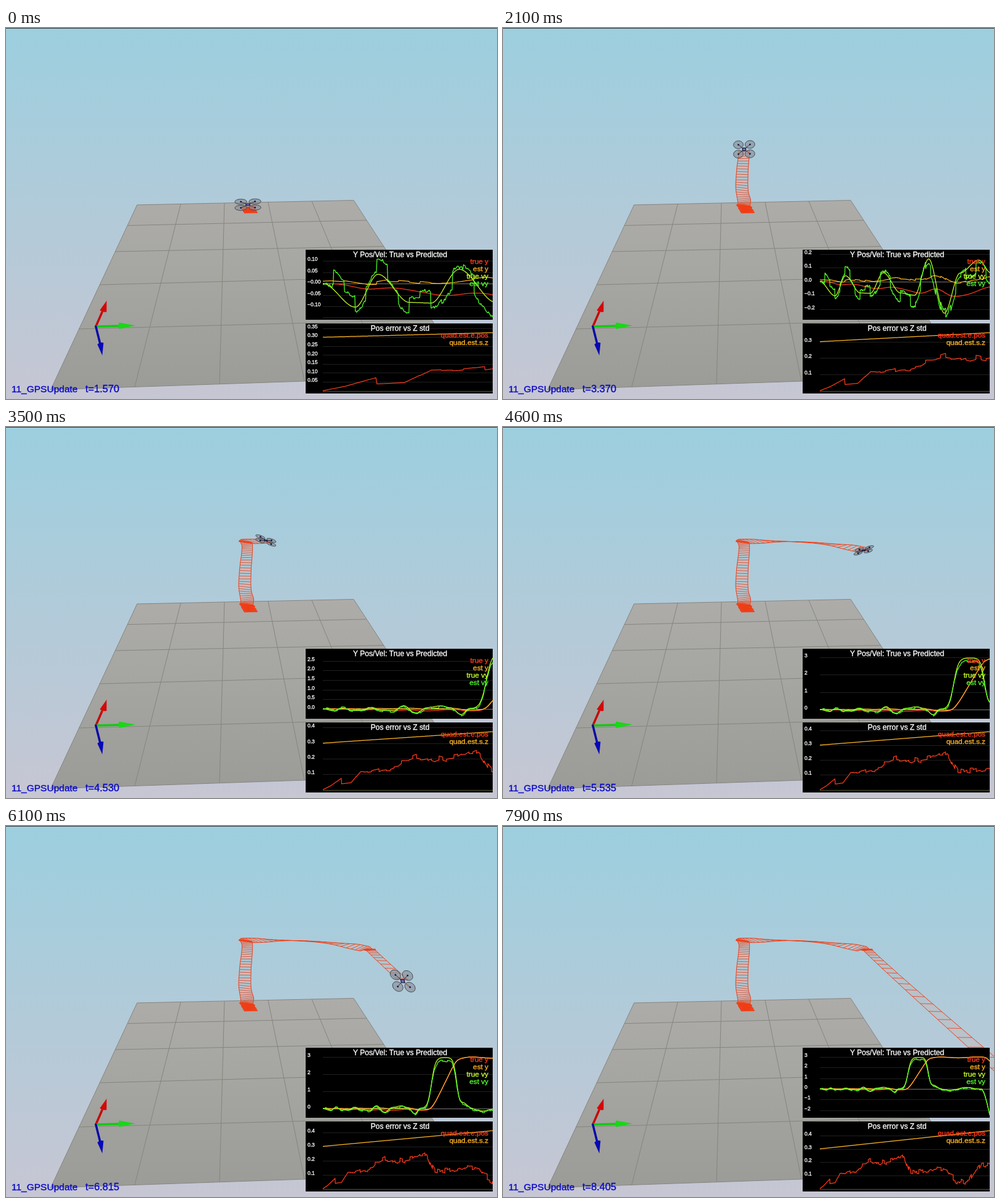
These frames come from a looping animation (798x604 px, 8000 ms). An HTML page:

```html
<!DOCTYPE html>
<html lang="en">
<head>
<meta charset="utf-8">
<title>Quad estimator</title>
<style>
html, body { margin: 0; width: 100%; height: 100%; overflow: hidden; background: #b4c9d6; }
svg { display: block; width: 798px; height: 604px; }
text { font-family: "Liberation Sans", Arial, sans-serif; stroke-width: .35; }
.thin * { vector-effect: non-scaling-stroke; }
.plot { fill: none; stroke-width: 1.25; stroke-linejoin: round; }
.status { fill: #0808c8; stroke: #0808c8; }
</style>
</head>
<body>
<svg viewBox="0 0 798 604">
  <defs>
    <linearGradient id="sky" x1="0" y1="0" x2="0" y2="1">
      <stop offset="0" stop-color="#9ccfdf"/><stop offset="1" stop-color="#c7c6d3"/>
    </linearGradient>
    <linearGradient id="floor" x1="0" y1="0" x2="0" y2="1">
      <stop offset="0" stop-color="#adaca9"/><stop offset="1" stop-color="#9b9c97"/>
    </linearGradient>
  </defs>
  <rect width="798" height="604" fill="url(#sky)"/>
  <rect width="798" height="1" fill="#333a3d"/>
  <path d="M213 288L565 280.500L751 566L72.500 589Z" fill="url(#floor)" stroke="#85857f"/>
  <path d="M284 286.500L209 585M355 285L347 580M426 283.500L485 575M497 282L617 571
    M198 321.500L586 313M177 364L614 355.500M152 418L647 405M118 490L689 475" fill="none" stroke="#85857f"/>
  <g stroke-width="3.500" stroke-linecap="round">
    <path d="M146 486L156 463" stroke="#c40808"/>
    <path d="M163.500 444L152.500 459.500Q157 464 163.500 462Z" fill="#d40808"/>
    <path d="M146 486L184 485" stroke="#14c814"/>
    <path d="M210.500 484.500L184 479.500Q181 485 184 490Z" fill="#18d818"/>
    <path d="M146 486L153 514" stroke="#0808a8"/>
    <path d="M156.500 533L148.500 515Q153 511 158.500 512.500Z" fill="#0808b8"/>
  </g>
  <path id="band" fill="#c8aaa0" fill-opacity=".25"/>
  <path id="rungs" fill="none" stroke="#f23c14" stroke-width=".8"/>
  <path id="rails" fill="none" stroke="#f23c14"/>
  <g id="drone" class="thin"></g>
  <g id="charts"></g>
  <text class="status" x="9" y="593" font-size="15.500">11_GPSUpdate</text>
  <text class="status" id="clock" x="129" y="593" font-size="16.400"></text>
</svg>
<script>
const $ = id => document.getElementById(id);
const clamp = (v, a, b) => Math.min(b, Math.max(a, v));
const smooth = u => { u = clamp(u, 0, 1); return u * u * (3 - 2 * u); };
const sigmoid = u => 1 / (1 + Math.exp(-u));
const bump = (t, mid, width) => Math.exp(-(((t - mid) / width) ** 2));
const hash = n => { const s = Math.sin(n * 12.9898) * 43758.5453; return s - Math.floor(s); };

// Run through [time, value] points with the given easing.
const through = (points, ease) => t => {
  let i = 0;
  while (i < points.length - 2 && t >= points[i + 1][0]) i++;
  const [a, u] = points[i], [b, v] = points[i + 1];
  return u + (v - u) * ease(clamp((t - a) / (b - a), 0, 1));
};
const straight = u => u;

// Simulation clock: 100 ms steps, two of them held.
const simTime = through([[0, 1.57], [9, 2.31], [21, 3.37], [34, 4.53], [45, 5.535], [59, 6.815], [77, 8.405]], straight);
const clockAt = k => Math.round(simTime(k - (k >= 31) - (k >= 58)) * 200) / 200;

// Sideways speed: hover sway, one fast leg, a settling wave, then the way back.
const sway = through([[0, 0], [.3, -.104], [.51, .041], [.8, -.083], [1, -.086], [1.26, .063], [1.6, -.083],
  [1.88, -.1], [2.16, .163], [2.47, -.23], [2.78, .06], [3.15, .155], [3.4, .06], [3.69, -.3], [3.9, 0]], smooth);
function speed(t) {
  const leg = 2.96 * (sigmoid((t - 4.36) / .08) - sigmoid((t - 5.37) / .065)) + .3 * bump(t, 5.65, .2);
  const wave = t > 6 && t < 7.7 ? -.14 * Math.sin((t - 6) * 3.7) : 0;
  return sway(t) + leg + wave - 2.5 * Math.max(0, (t - 8) / .41) ** 1.5;
}
const accel = t => (speed(t + .02) - speed(t - .02)) / .04;

const DT = .005, COUNT = 1683;
const sideways = [0];
for (let i = 1; i < COUNT; i++) sideways.push(sideways[i - 1] + speed((i - .5) * DT) * DT);
const pos = t => sideways[clamp(Math.round(t / DT), 0, COUNT - 1)];

// The estimate jumps with every GPS fix, ten times a second.
const cell = t => Math.floor(t * 10 + 1e-6);
const jag = (t, amp, seed) => {
  const c = cell(t);
  return amp * (hash(c + seed) - .5 + (t * 10 - c) * (hash(c + seed + 50) - .5) * .6);
};
const bias = t => t < .09 ? 0 :
  Math.max(-.04, .04 - .045 * t) + .055 * Math.cos(2 * Math.PI * (cell(t) / 10 - .12) / .38);
const grain = t => (hash(Math.floor(t * 100) + 7) - .5) * .012;
const errorLevel = through([[0, 0], [.2, .024], [.49, .073], [.5, .038], [.75, .045], [1, .112], [1.6, .125],
  [2.4, .205], [3, .2], [4.15, .25], [4.5, .13], [5.2, .14], [6.1, .15], [6.8, .05], [7.4, .065], [8, .185], [8.41, .195]], straight);

const signals = {
  y: pos,
  estY: t => pos(t) + .1 * bump(t, 2.4, 1.6) + jag(t, .016, 11) * clamp(t * 2, 0, 1),
  vy: speed,
  estVy: t => .95 * speed(t) + bias(t) + grain(t),
  err: t => Math.max(0, errorLevel(t) + jag(t, .04, 31) * smooth((t - .6) / 1.4)),
  std: t => .3 + .0163 * t
};
const data = {};
for (const k in signals) data[k] = Array.from({ length: COUNT }, (_, i) => signals[k](i * DT));

// Screen pose: centre, then the drone's right and forward axes.
function pose(t) {
  const climb = smooth((t - 2.05) / 1.7), side = pos(t);
  const near = 178 * Math.max(0, t - 6.25) ** 2, pitch = clamp(near / 50, 0, 1);
  return {
    x: 398 - Math.min(t, 4) + 66.5 * side + near,
    y: 297 - 6 * Math.min(t, 2.05) - 100 * climb + 18 * Math.max(0, side / 3) ** 3 + .9 * near,
    ax: 11.5 - 2.4 * climb - .3 * side + .03 * near,
    ay: 4 * Math.tanh(accel(t) / 4),
    bx: .35 * side - 3 * pitch,
    by: -5 + 2 * climb - 4.4 * bump(t, 3.4, .45) - 6.5 * pitch
  };
}

const RED = "#ff3a1a", AMBER = "#ffb424", LIME = "#c8ff28", GREEN = "#50ff28";
const charts = [
  { top: 361, title: "Y Pos/Vel: True vs Predicted", zero: "#777",
    lines: [["y", "true y", RED], ["estY", "est y", AMBER], ["vy", "true vy", LIME], ["estVy", "est vy", GREEN]] },
  { top: 481, title: "Pos error vs Z std", zero: "#55552c", low: 0,
    lines: [["err", "quad.est.e.pos", RED], ["std", "quad.est.s.z", AMBER]] }
];
const label = (x, y, size, color, anchor, text) =>
  `<text x="${x}" y="${y}" font-size="${size}" fill="${color}" stroke="${color}" text-anchor="${anchor}">${text}</text>`;

$("charts").innerHTML = charts.map((c, n) =>
  `<rect x="487" y="${c.top}" width="304" height="114"/><g id="grid${n}"></g>` +
  c.lines.map(([id, , color]) => `<polyline id="${id}" class="plot" stroke="${color}"/>`).join("") +
  label(640.5, c.top + 12, 12.1, "#fff", "middle", c.title) +
  c.lines.map(([, name, color], i) => label(784, c.top + 23 + 12 * i, 11.8, color, "end", name)).join("")
).join("");

function tickStep(range) {
  for (let p = .01; ; p *= 10)
    for (const m of [1, 2, 5]) if (range / (p * m) <= 6.55) return p * m;
}

function drawChart(c, n, now) {
  const count = Math.round(now / DT);
  let lo = Infinity, hi = -Infinity;
  for (const [key] of c.lines)
    for (let i = 0; i <= count; i++) {
      lo = Math.min(lo, data[key][i]);
      hi = Math.max(hi, data[key][i]);
    }
  lo = c.low ?? lo;
  const yOf = v => c.top + 109.5 - (v - lo) / (hi - lo) * 94.5;
  for (const [key] of c.lines) {
    let pts = "";
    for (let i = 0; i <= count; i++)
      pts += (515 + 276 * i / count).toFixed(1) + "," + yOf(data[key][i]).toFixed(1) + " ";
    $(key).setAttribute("points", pts);
  }
  const step = tickStep(hi - lo), digits = step > .99 ? 0 : step > .099 ? 1 : 2;
  let grid = "";
  for (let i = Math.floor(lo / step) - 1; i <= hi / step + 2; i++) {
    const y = yOf(i * step);
    if (y < c.top + 6 || y > c.top + 112) continue;
    grid += `<path d="M515 ${Math.round(y) + .5}H791" stroke="${i ? "#202020" : c.zero}"/>`;
    if (y > c.top + 108) continue;
    const minus = i < 0 || (i === 0 && digits === 2) ? "−" : "";
    grid += label(490, y.toFixed(1), 8.5, "#fff", "start", minus + Math.abs(i * step).toFixed(digits));
  }
  $("grid" + n).innerHTML = grid;
}

const corners = [[-1, 1], [1, 1], [-1, -1], [1, -1]];
$("drone").innerHTML =
  corners.map(([x, y]) => `<circle cx="${x}" cy="${y}" r=".84" fill="#8a8f9a" fill-opacity=".65" stroke="#3c3f46" stroke-width=".9"/>`).join("") +
  corners.map(([x, y], i) => `<path d="M0 0L${x} ${y}" stroke="${i === 3 ? "#a03428" : "#34343c"}"/>
    <path d="M${x} ${y}h.01" stroke="#14143c" stroke-width="2.8" stroke-linecap="round"/>`).join("") +
  `<path d="M-.28 -.28H.28V.28H-.28Z" fill="#6a70b8" stroke="#16163c" stroke-width="1.2"/>`;

// Ends of the ribbon across the drone at time t.
function ends(t) {
  const p = pose(t), dy = clamp(8 - 1.5 * t, -2, 4);
  return [-.92, .92].map(s => (p.x + s * p.ax).toFixed(1) + " " + (p.y + dy + s * p.ay).toFixed(1));
}

function drawTrail(now) {
  const pairs = [], last = Math.min(now, 7.5);
  for (let t = 0; t < last; t += .05) pairs.push(ends(t));
  pairs.push(ends(last));
  const left = pairs.map(p => p[0]), right = pairs.map(p => p[1]);
  $("rungs").setAttribute("d", pairs.map(p => "M" + p.join("L")).join(""));
  $("rails").setAttribute("d", "M" + left.join("L") + "M" + right.join("L"));
  $("band").setAttribute("d", "M" + left.concat(right.reverse()).join("L") + "Z");
}

function draw(k) {
  const now = clockAt(k), p = pose(now);
  $("clock").textContent = "t=" + now.toFixed(3);
  drawTrail(now);
  $("drone").setAttribute("transform", `matrix(${[p.ax, p.ay, p.bx, p.by, p.x, p.y].map(v => v.toFixed(3)).join(" ")})`);
  charts.forEach((c, n) => drawChart(c, n, now));
}

let shown = -1;
const start = performance.now();
function tick() {
  const k = Math.floor((performance.now() - start) % 8000 / 100);
  if (k !== shown) draw(shown = k);
  requestAnimationFrame(tick);
}
tick();
</script>
</body>
</html>
```
